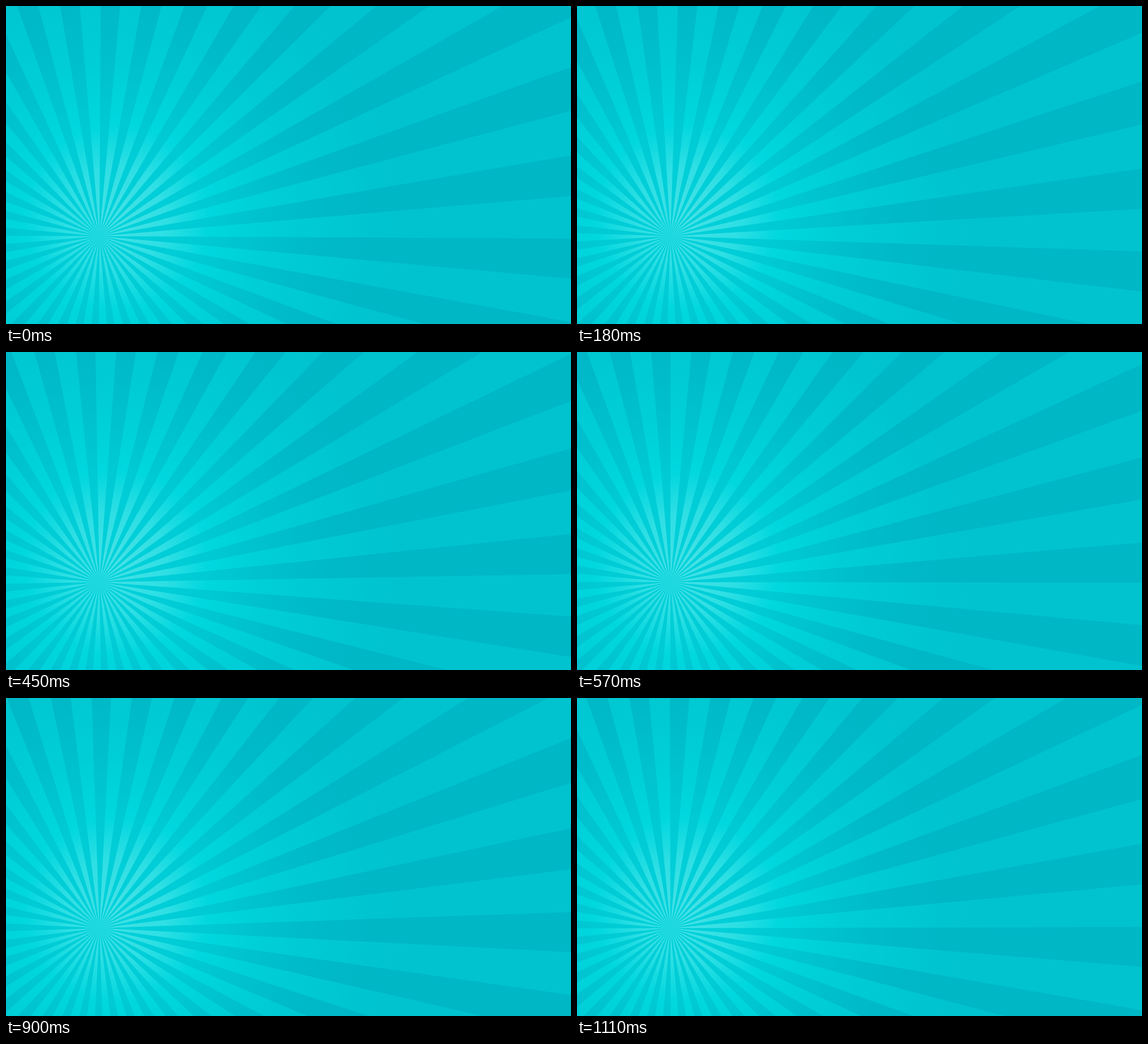
Recreate the animation shown at these times as an HTML page with a canvas. Size 998 by 561 pixels, loop 1.14 s.

```html
<!DOCTYPE html>
<html lang="en">
<head>
<meta charset="utf-8">
<title>Turning sunburst</title>
<style>
  html, body { margin: 0; width: 100%; height: 100%; overflow: hidden; background: #00b7c6; }
  canvas { display: block; }
</style>
</head>
<body>
<canvas id="stage" width="998" height="561"></canvas>
<script>
const ctx = document.getElementById('stage').getContext('2d');
const HUB = { x: 165, y: 406 };
const GLOW = { x: 195, y: 373 };
const LOOP = 1140, STEP = 30;
const RAYS = 36, PITCH = 10, WIDTH = 5.16;
const START = -4.86, TURN = 0.2585; // degrees, degrees per step
const REACH = 1500;
const rad = deg => deg * Math.PI / 180;

function glow(radius, stops) {
  const g = ctx.createRadialGradient(GLOW.x, GLOW.y, 0, GLOW.x, GLOW.y, radius);
  for (const [at, color] of stops) g.addColorStop(at / radius, color);
  return g;
}

// The shading stays still while the rays turn through it.
const dark = glow(440, [[0, '#00d2db'], [150, '#00cbd5'], [260, '#00c1cd'], [370, '#00b9c8'], [440, '#00b7c6']]);
const light = glow(490, [[0, '#48e1e6'], [90, '#2edfe4'], [165, '#00d7de'], [270, '#00ced7'], [490, '#00c3cf']]);

function spoke(deg) {
  const a = rad(deg);
  ctx.lineTo(HUB.x + REACH * Math.cos(a), HUB.y + REACH * Math.sin(a));
}

function draw(now) {
  const turn = START + Math.floor(now % LOOP / STEP) * TURN;
  ctx.fillStyle = dark;
  ctx.fillRect(0, 0, 998, 561);
  ctx.beginPath();
  for (let i = 0; i < RAYS; i++) {
    const a = turn + i * PITCH;
    ctx.moveTo(HUB.x, HUB.y);
    spoke(a);
    spoke(a + WIDTH);
    ctx.closePath();
  }
  ctx.fillStyle = light;
  ctx.fill();
}

let origin;
function tick(now) {
  origin ??= now;
  draw(now - origin);
  requestAnimationFrame(tick);
}
draw(0);
requestAnimationFrame(tick);
</script>
</body>
</html>
```
